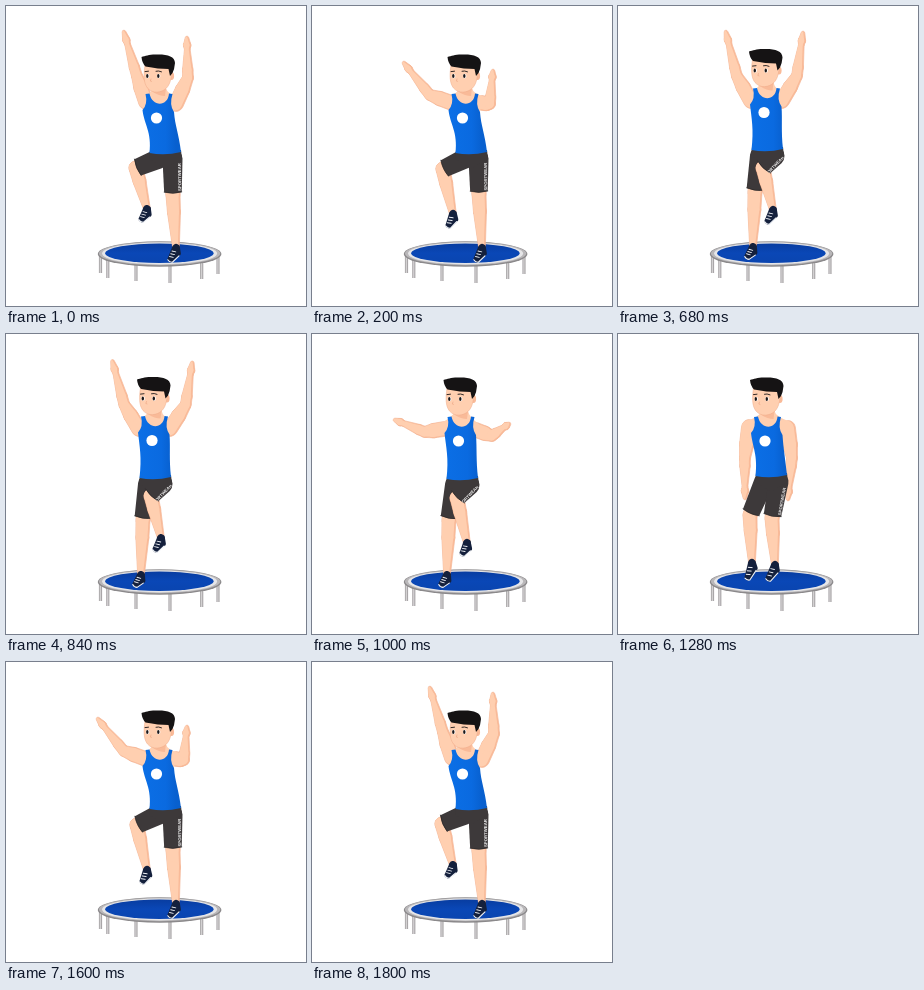
Animation, 300 px wide and 300 px high, one loop 1.84 s. Source, as an HTML page with a canvas:

```html
<!DOCTYPE html>
<html lang="en">
<head>
<meta charset="utf-8">
<title>Trampoline step</title>
<style>
html, body { margin: 0; width: 100%; height: 100%; overflow: hidden; background: #fff; }
canvas { display: block; width: 100vw; height: 100vh; }
</style>
</head>
<body>
<canvas id="stage"></canvas>
<script>
const LOOP = 1840, STEP = 40;
const SKIN = '#ffcfb0', SHADE = '#f9ba98', EDGE = '#eeaa88';
const SHORTS = '#3d393a', NAVY = '#14203c', HAIR = '#151314';

const canvas = document.getElementById('stage');
const g = canvas.getContext('2d');

// body: head x, y, hip x, y | arm: shoulder, elbow, fingertip | leg: knee, ankle, toe
const POSES = {
  upA: {
    body: [0.5, 3, 159, 146],
    armL: [140, 96, 131, 70, 118, 26], armR: [170, 98, 182, 72, 181, 32],
    legL: [130, 162, 141, 203, 136, 213], legR: [167, 189, 170, 242, 165, 253]
  },
  halfA: {
    body: [0.5, 3, 159, 146],
    armL: [140, 97, 118, 89, 92, 57], armR: [170, 97, 178, 98, 181, 65],
    legL: [131, 163, 141, 208, 137, 219], legR: [167, 188, 170, 242, 165, 253]
  },
  downA: {
    body: [0, 0, 155, 142],
    armL: [134, 95, 128, 126, 122, 164], armR: [173, 95, 178, 124, 176, 166],
    legL: [137, 183, 137, 234, 132, 246], legR: [157, 185, 161, 232, 154, 244]
  },
  halfB: {
    body: [-3.5, -2, 150, 144],
    armL: [132, 95, 113, 98, 83, 86], armR: [164, 96, 180, 102, 197, 90],
    legL: [137, 186, 135, 241, 130, 250], legR: [145, 164, 155, 209, 151, 219]
  },
  upB: {
    body: [-4, -2.5, 149, 143],
    armL: [133, 95, 119, 70, 108, 26], armR: [164, 95, 179, 70, 185, 27],
    legL: [137, 186, 135, 241, 130, 250], legR: [145, 162, 155, 204, 150, 215]
  },
  downB: {
    body: [-3, -2, 153, 141],
    armL: [131, 93, 127, 124, 127, 164], armR: [170, 94, 174, 124, 170, 165],
    legL: [132, 181, 134, 229, 130, 243], legR: [154, 184, 157, 231, 151, 244]
  }
};

const KEYS = [
  [0, 'upA'], [200, 'halfA'], [400, 'downA'], [540, 'halfB'], [680, 'upB'],
  [820, 'upB'], [1000, 'halfB'], [1280, 'downB'], [1600, 'halfA'], [1760, 'upA']
];

// Arms turn about their joints, so they are blended as lengths and angles.
function toPolar(arm, left) {
  const out = arm.slice(0, 2);
  for (let i = 2; i < 6; i += 2) {
    const dx = arm[i] - arm[i - 2], dy = arm[i + 1] - arm[i - 1];
    let a = Math.atan2(dy, dx);
    if (left && a < 0) a += 2 * Math.PI;
    out.push(Math.hypot(dx, dy), a);
  }
  return out;
}

function fromPolar(v) {
  const pts = [{ x: v[0], y: v[1] }];
  for (let i = 2; i < 6; i += 2) {
    const p = pts[pts.length - 1];
    pts.push({ x: p.x + v[i] * Math.cos(v[i + 1]), y: p.y + v[i] * Math.sin(v[i + 1]) });
  }
  return pts;
}

const toPoints = v => {
  const pts = [];
  for (let i = 0; i < v.length; i += 2) pts.push({ x: v[i], y: v[i + 1] });
  return pts;
};

for (const p of Object.values(POSES)) {
  p.armL = toPolar(p.armL, true);
  p.armR = toPolar(p.armR, false);
}

function keyAt(i) {
  const n = KEYS.length, k = ((i % n) + n) % n;
  return { t: KEYS[k][0] + LOOP * Math.floor(i / n), pose: POSES[KEYS[k][1]] };
}

function tangent(a, b) {
  return a * b <= 0 ? 0 : 2 * a * b / (a + b);
}

// Smooth cyclic blend without overshoot.
function track(name, t) {
  let i = KEYS.length - 1;
  while (KEYS[i][0] > t) i--;
  const k = [i - 1, i, i + 1, i + 2].map(keyAt);
  const h = k[2].t - k[1].t, u = (t - k[1].t) / h;
  return k[1].pose[name].map((_, c) => {
    const v = k.map(q => q.pose[name][c]);
    const s = [0, 1, 2].map(j => (v[j + 1] - v[j]) / (k[j + 1].t - k[j].t));
    const m0 = tangent(s[0], s[1]) * h, m1 = tangent(s[1], s[2]) * h;
    const u2 = u * u, u3 = u2 * u;
    return (2 * u3 - 3 * u2 + 1) * v[1] + (u3 - 2 * u2 + u) * m0 +
           (3 * u2 - 2 * u3) * v[2] + (u3 - u2) * m1;
  });
}

const mix = (a, b, f) => ({ x: a.x + (b.x - a.x) * f, y: a.y + (b.y - a.y) * f });

function fill(color, path) {
  g.fillStyle = color;
  g.beginPath();
  path();
  g.fill();
}

function line(color, width, path) {
  g.strokeStyle = color;
  g.lineWidth = width;
  g.beginPath();
  path();
  g.stroke();
}

const oval = (x, y, rx, ry) => g.ellipse(x, y, rx, ry, 0, 0, 7);

function capsule(a, b, ra, rb) {
  const ang = Math.atan2(b.y - a.y, b.x - a.x);
  const d = Math.max(Math.hypot(b.x - a.x, b.y - a.y), 0.01);
  const off = Math.acos(Math.max(-1, Math.min(1, (ra - rb) / d)));
  g.moveTo(a.x + ra * Math.cos(ang + off), a.y + ra * Math.sin(ang + off));
  g.arc(a.x, a.y, ra, ang + off, ang - off + 2 * Math.PI);
  g.arc(b.x, b.y, rb, ang - off, ang + off);
  g.closePath();
}

// parts: [from, to, radius, radius]
function limb(parts) {
  for (const p of parts) line(EDGE, 0.6, () => capsule(...p));
  for (const p of parts) fill(SHADE, () => capsule(...p));
  g.save();
  g.translate(-0.7, -0.2);
  for (const [a, b, ra, rb] of parts) fill(SKIN, () => capsule(a, b, ra - 0.8, rb - 0.7));
  g.restore();
}

function arm([s, e, tip]) {
  const bicep = mix(s, e, 0.55), fore = mix(e, tip, 0.2);
  const wrist = mix(e, tip, 0.72), palm = mix(e, tip, 0.82);
  limb([
    [s, bicep, 7.4, 7.2], [bicep, e, 7.2, 5.4], [e, fore, 5.4, 5.2],
    [fore, wrist, 5.2, 2.8], [wrist, palm, 2.8, 3.7], [palm, tip, 3.7, 1.8]
  ]);
}

function shoe(a, toe) {
  const d = Math.hypot(toe.x - a.x, toe.y - a.y);
  g.save();
  g.translate(a.x, a.y);
  g.rotate(Math.atan2(toe.y - a.y, toe.x - a.x));
  const top = { x: 0, y: 0 }, tip = { x: d, y: 0 }, heel = { x: 4, y: -4.5 };
  fill(NAVY, () => {
    capsule(top, tip, 3.9, 3.3);
    capsule(top, heel, 3.9, 2.4);
    capsule(heel, tip, 2.4, 3.3);
  });
  line('#eef1f6', 1.1, () => {
    g.moveTo(heel.x + 2, heel.y - 1.5);
    g.lineTo(d + 2.4, -2.6);
    g.quadraticCurveTo(d + 3.8, 0, d + 2, 2.6);
  });
  line('#f4f6fa', 0.9, () => {
    for (const f of [0.3, 0.55, 0.8]) {
      g.moveTo(d * f, -1.4);
      g.lineTo(d * f + 0.8, 2.4);
    }
  });
  g.restore();
}

function leg([knee, ankle, toe], hip, outer) {
  const hem = mix(hip, knee, 0.92);
  const calf = mix(knee, ankle, 0.32);
  limb([[mix(hip, knee, 0.6), knee, 8, 7], [knee, calf, 7, 6.5], [calf, ankle, 6.5, 3.3]]);
  shoe(ankle, toe);

  const len = Math.hypot(hem.x - hip.x, hem.y - hip.y);
  g.save();
  g.translate(hip.x, hip.y);
  g.rotate(Math.atan2(hem.y - hip.y, hem.x - hip.x));
  const shape = () => {
    g.moveTo(0, -10);
    g.arc(0, 0, 10, -Math.PI / 2, Math.PI / 2, true);
    g.lineTo(len, 8.8);
    g.quadraticCurveTo(len + 2.5, 0, len, -8.8);
    g.closePath();
  };
  fill(SHORTS, shape);
  line('#292627', 0.7, () => {
    g.moveTo(len, 8.8);
    g.quadraticCurveTo(len + 2.5, 0, len, -8.8);
  });
  if (outer) {
    g.beginPath();
    shape();
    g.clip();
    g.translate(len * 0.55, -7.2);
    g.rotate(Math.PI);
    g.fillStyle = '#f2f2f2';
    g.font = 'bold 4.3px "Liberation Sans", Arial, sans-serif';
    g.textAlign = 'center';
    g.textBaseline = 'middle';
    g.fillText('SPORTWEAR', 0, 0);
  }
  g.restore();
}

function torso(sl, sr, hip, dx, dy) {
  const nx = 152.5 + dx, ny = 87 + dy;
  fill(SKIN, () => {
    g.moveTo(sl.x - 3, sl.y - 6);
    g.quadraticCurveTo(nx - 8, ny - 2, nx - 6, ny - 8);
    g.lineTo(nx + 7, ny - 8);
    g.quadraticCurveTo(nx + 8, ny - 2, sr.x + 3, sr.y - 6);
    g.lineTo(nx + 13, ny + 20);
    g.lineTo(nx - 13, ny + 20);
  });
  fill(SHADE, () => {
    g.moveTo(nx - 6, ny - 8);
    g.lineTo(nx + 7, ny - 8);
    g.lineTo(nx + 6, ny);
    g.quadraticCurveTo(nx, ny, nx - 6, ny - 4);
  });
  const shirt = () => {
    g.moveTo(nx - 13.5, ny - 2);
    g.quadraticCurveTo(nx - 11, ny + 8, nx - 16.5, ny + 14);
    g.bezierCurveTo(nx - 15, ny + 28, hip.x - 13, hip.y - 20, hip.x - 15.5, hip.y + 1);
    g.quadraticCurveTo(hip.x, hip.y + 4, hip.x + 16, hip.y);
    g.bezierCurveTo(hip.x + 14, hip.y - 18, nx + 16, ny + 30, nx + 15, ny + 16);
    g.quadraticCurveTo(nx + 10, ny + 9, nx + 13.5, ny - 2);
    g.lineTo(nx + 10, ny - 2.5);
    g.bezierCurveTo(nx + 9, ny + 11, nx - 7, ny + 11, nx - 9.5, ny - 2.5);
    g.closePath();
  };
  const tone = g.createLinearGradient(nx - 17, 0, nx + 17, 0);
  tone.addColorStop(0, '#0b6fe6');
  tone.addColorStop(0.7, '#0a6ae0');
  tone.addColorStop(1, '#0860cf');
  fill(tone, shirt);
  fill('#fff', () => oval(nx - 2.5, ny + 22, 5.6, 5.6));
}

function head(dx, dy) {
  g.save();
  g.translate(dx, dy);
  const face = () => {
    g.moveTo(138.5, 56);
    g.bezierCurveTo(137, 66, 137, 74, 141, 79);
    g.bezierCurveTo(146, 85, 155, 84, 160, 79);
    g.bezierCurveTo(164, 75, 166, 67, 165, 55);
    g.closePath();
  };
  fill(SHADE, () => oval(165, 67, 2.6, 4));
  fill(SKIN, face);
  line(EDGE, 0.5, face);
  fill(HAIR, () => {
    g.moveTo(135, 48);
    g.bezierCurveTo(139, 47, 142, 45.5, 149, 45.5);
    g.bezierCurveTo(160, 45, 168.5, 47, 168.5, 54);
    g.quadraticCurveTo(168, 60, 166, 64);
    g.lineTo(163.5, 67);
    g.lineTo(162, 60);
    g.quadraticCurveTo(152, 60, 139, 57.5);
    g.quadraticCurveTo(135.5, 54, 135, 48);
  });
  line('#332a28', 1, () => {
    g.moveTo(138.5, 62.6);
    g.lineTo(142, 62.2);
    g.moveTo(149.5, 62.2);
    g.quadraticCurveTo(152, 61.4, 155, 62.8);
  });
  for (const x of [140.8, 151.8]) {
    fill('#fff', () => oval(x + 0.3, 67, 1.8, 2.3));
    fill('#1b1718', () => oval(x, 67, 1.2, 1.9));
  }
  line(EDGE, 0.7, () => {
    g.moveTo(144.5, 70);
    g.lineTo(143.8, 72);
    g.lineTo(145, 72.4);
  });
  g.restore();
}

function trampoline() {
  for (const [x, y, h] of [[94.5, 250, 17], [101.8, 253, 19], [130, 257, 18],
                           [164, 258, 19], [195.7, 255, 18], [212, 250, 18]]) {
    fill('#a9a6a8', () => g.rect(x - 1.6, y, 3.2, h));
    fill('#d3d1d2', () => g.rect(x - 0.7, y, 1.2, h));
  }
  fill('#8b898b', () => oval(153.6, 248, 61.8, 12.8));
  fill('#b9b7b9', () => oval(153.6, 247.5, 60.6, 11.7));
  fill('#e6e6e8', () => oval(153.6, 247.5, 57.5, 10.9));
  const mat = g.createLinearGradient(0, 237, 0, 257);
  mat.addColorStop(0, '#083c9f');
  mat.addColorStop(0.5, '#0a47b6');
  mat.addColorStop(1, '#0a45b0');
  fill(mat, () => oval(153.4, 247.2, 54.2, 9.7));
}

function draw(t) {
  const [dx, dy, hx, hy] = track('body', t);
  const armL = fromPolar(track('armL', t)), armR = fromPolar(track('armR', t));
  const legL = toPoints(track('legL', t)), legR = toPoints(track('legR', t));
  const hip = { x: hx, y: hy };
  const hipL = { x: hx - 7, y: hy + 7 }, hipR = { x: hx + 7.5, y: hy + 7 };

  g.fillStyle = '#fff';
  g.fillRect(0, 0, 300, 300);
  g.lineJoin = g.lineCap = 'round';
  trampoline();
  arm(armL);
  arm(armR);

  const legs = [() => leg(legL, hipL, false), () => leg(legR, hipR, true)];
  if (t < 400 || t > 1280) legs.reverse();
  legs.forEach(f => f());
  fill(SHORTS, () => {
    g.moveTo(hx - 15, hy - 2);
    g.lineTo(hx + 16, hy - 2);
    g.lineTo(hx + 17, hy + 7);
    g.lineTo(hx, hy + 17);
    g.lineTo(hx - 16, hy + 7);
  });
  torso(armL[0], armR[0], hip, dx, dy);
  head(dx, dy);
}

function resize() {
  const r = window.devicePixelRatio || 1;
  canvas.width = innerWidth * r;
  canvas.height = innerHeight * r;
  g.setTransform(canvas.width / 300, 0, 0, canvas.height / 300, 0, 0);
}

const start = performance.now();
function tick() {
  const t = (performance.now() - start) % LOOP;
  draw(Math.floor(t / STEP) * STEP);
  requestAnimationFrame(tick);
}

addEventListener('resize', resize);
resize();
tick();
</script>
</body>
</html>
```
